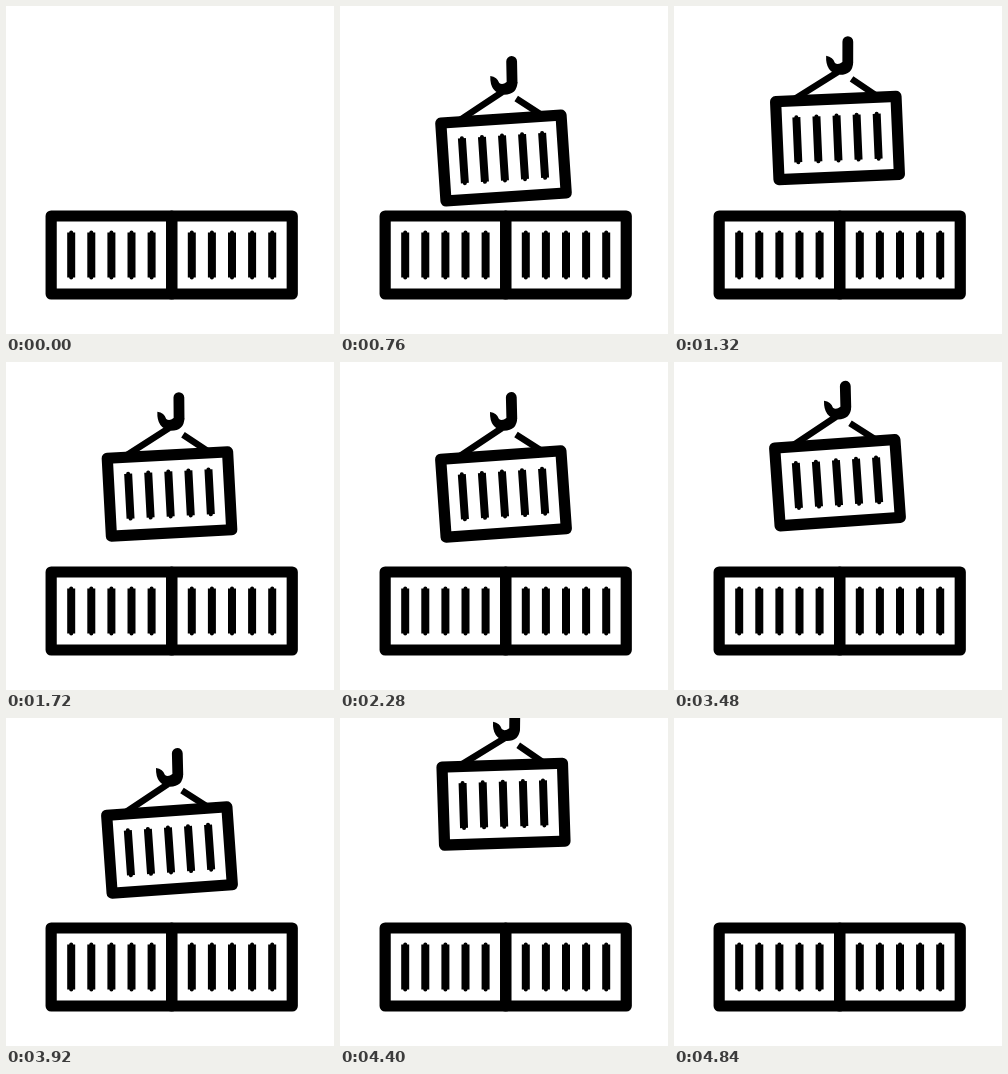
Recreate the animation shown at these times as an HTML page. Size 328 by 328 pixels, loop 5720 ms.

```html
<!DOCTYPE html>
<html lang="en">
<head>
<meta charset="utf-8">
<title>Crane and containers</title>
<style>
  html, body { margin: 0; width: 100%; height: 100%; overflow: hidden; background: #fff; }
  svg { display: block; width: 100vw; height: 100vh; }
</style>
</head>
<body>
<svg viewBox="0 0 328 328">
  <defs>
    <g id="container">
      <rect x="-60.25" y="-39" width="120.5" height="78" fill="none" stroke="#000" stroke-width="11.2" stroke-linejoin="round"/>
      <path d="M-40.2-22.5v45M-20.1-22.5v45M0-22.5v45M20.1-22.5v45M40.2-22.5v45" stroke="#000" stroke-width="8"/>
      <path d="M-40.2-22.5v45M-20.1-22.5v45M0-22.5v45M20.1-22.5v45M40.2-22.5v45" stroke="#000" stroke-width="4" stroke-linejoin="round" stroke-linecap="round"/>
    </g>
  </defs>
  <use href="#container" x="105.4" y="249"/>
  <use href="#container" x="226" y="249"/>
  <g id="load">
    <use href="#container" transform="translate(163.5 132) rotate(-4)"/>
    <path d="M120 94L162 66M176 72.5L205 91" stroke="#000" stroke-width="6.5"/>
    <path d="M171.3 35.4L171.8 56" stroke="#000" stroke-width="10.8" stroke-linecap="round"/>
    <path d="M150 50Q157 51 159 57Q162 59.5 166.4 56H177.2Q177 68.5 164 68.7Q149.5 67 150 50Z"/>
  </g>
</svg>
<script>
const LOOP = 5720, STEP = 40;
const load = document.getElementById('load');

const easeIn = p => p * p;
const easeOut = p => p * (2 - p);
const easeInOut = p => (1 - Math.cos(Math.PI * p)) / 2;

// Keys: [time, value, easing towards this key]
const lift = [
  [360, -192], [780, 20.5, easeOut], [1240, 0], [2440, 0],
  [3300, -14], [3920, 0], [3980, 0], [4840, -192, easeIn]
];
const tilt = [
  [360, 4], [760, 0.2, easeOut], [920, -0.5], [1320, 1.5],
  [2280, 0], [3920, 0], [4840, 4]
];

function valueAt(keys, t) {
  const next = keys.findIndex(key => key[0] > t);
  if (next < 0) return keys[keys.length - 1][1];
  if (next === 0) return keys[0][1];
  const [t0, from] = keys[next - 1];
  const [t1, to, ease = easeInOut] = keys[next];
  return from + (to - from) * ease((t - t0) / (t1 - t0));
}

function draw() {
  const t = Math.floor(performance.now() % LOOP / STEP) * STEP;
  load.setAttribute('transform',
    `translate(0 ${valueAt(lift, t)}) rotate(${valueAt(tilt, t)} 163.5 132)`);
  requestAnimationFrame(draw);
}
draw();
</script>
</body>
</html>
```
